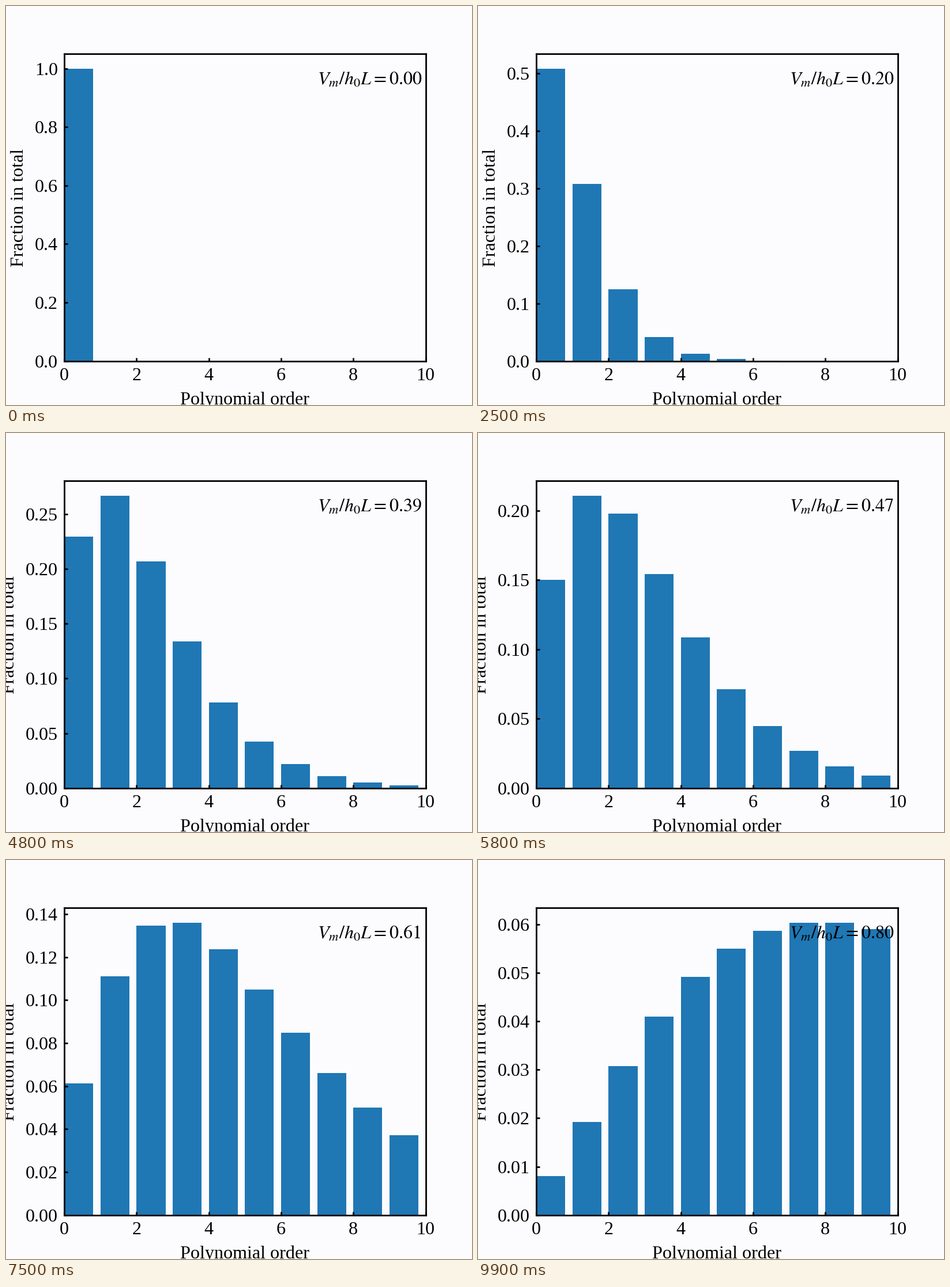
Recreate the animation shown at these times as a matplotlib script. Size 808 by 693 pixels, loop 10 s.

```python
import matplotlib.pyplot as plt
import numpy as np
from matplotlib.animation import FuncAnimation

FRAMES = 100
BG = "#fcfcfe"

plt.rcParams.update({
    "font.family": "Liberation Serif",
    "font.size": 23.1,
    "mathtext.fontset": "stix",
    "axes.linewidth": 2,
    "axes.labelpad": 9.2,
    "axes.facecolor": BG,
    "figure.facecolor": BG,
    "figure.subplot.left": 0.1251,
    "figure.subplot.right": 0.9005,
})
for axis in ("xtick", "ytick"):
    plt.rcParams.update({
        f"{axis}.direction": "in",
        f"{axis}.major.size": 4.6,
        f"{axis}.major.width": 2,
        f"{axis}.major.pad": 8.1,
    })

orders = np.arange(10)
ratios = np.linspace(0, 0.8, FRAMES)


def fractions(v):
    """Share of each order: the normalised terms of 1 / (1 - v)**3."""
    return (1 - v) ** 3 * (orders + 1) * (orders + 2) / 2 * v ** orders


fig, ax = plt.subplots(figsize=(8.08, 6.93), dpi=100)
bars = ax.bar(orders, fractions(0), width=0.8, align="edge", color="#1f77b4")
label = ax.text(0.7, 0.9, "", transform=ax.transAxes)
ax.set_xlim(0, 10)
ax.set_xlabel("Polynomial order")
ax.set_ylabel("Fraction in total")


def update(i):
    heights = fractions(ratios[i])
    for bar, h in zip(bars, heights):
        bar.set_height(h)
    ax.set_ylim(0, 1.05 * heights.max())
    label.set_text(f"$V_m/h_0L={ratios[i]:.2f}$")
    return [*bars, label]


anim = FuncAnimation(fig, update, frames=FRAMES, interval=100,
                     repeat=True, repeat_delay=0, blit=False)
plt.show()
```
